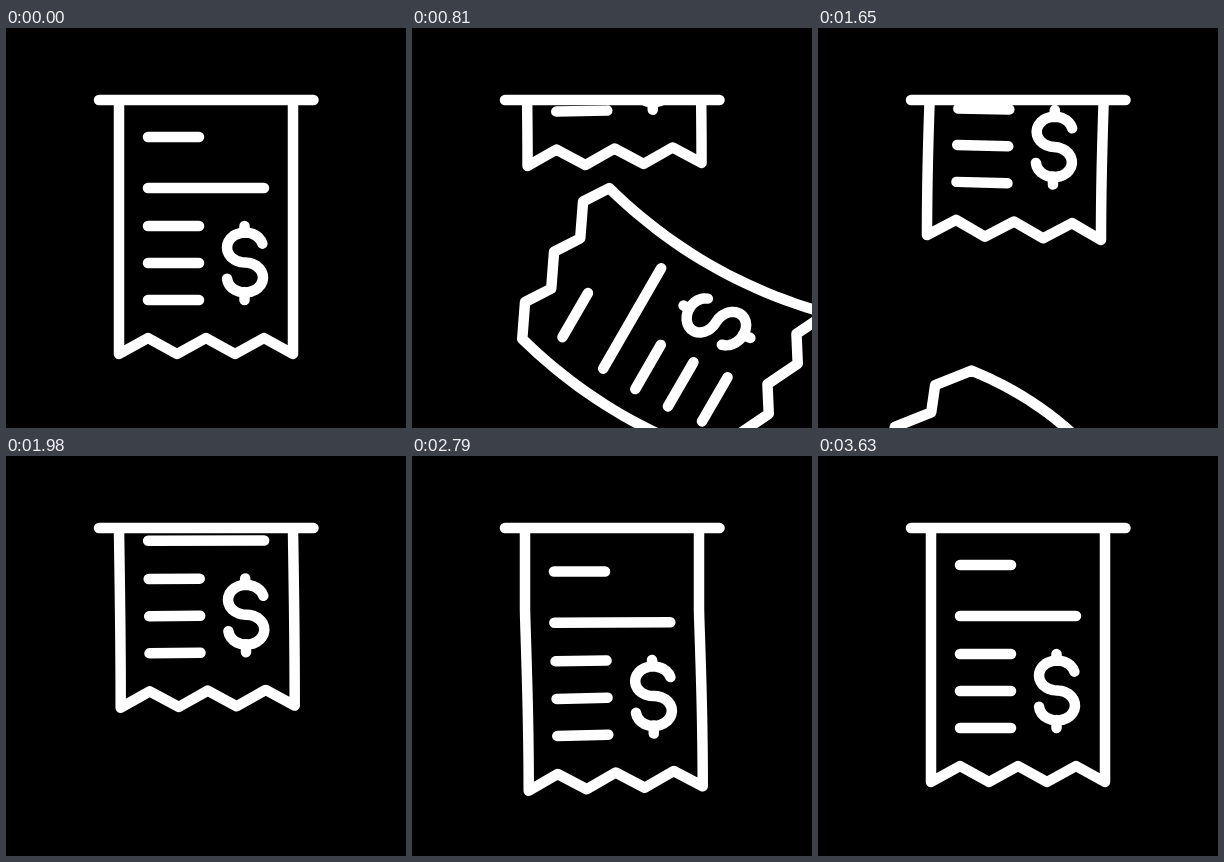
Write an HTML page with a canvas that moves like this. It is 400x400 px and loops after 4.14 s.

```html
<!DOCTYPE html>
<html lang="en">
<head>
<meta charset="utf-8">
<title>Receipt</title>
<style>
html, body { margin: 0; width: 100%; height: 100%; overflow: hidden; background: #000; }
canvas { display: block; }
</style>
</head>
<body>
<canvas id="stage" width="400" height="400"></canvas>
<script>
const ctx = document.getElementById('stage').getContext('2d');
const LOOP = 4140, STEP = 30, TEAR = 420, FEED = 560, SETTLE = 3270, REST = 3630;

// time, centre x, centre y, angle in degrees, bend
const FALL = [
  [0, 200, 200, 0, 0], [300, 184.5, 202, 7, 0], [540, 206, 229, -4, 4],
  [810, 262, 298, -60, 16], [1260, 191, 416, -67, 0], [1440, 142, 452, -58, -14],
  [1650, 183, 492, -46, -25], [2130, 235, 650, -30, 0]
];
// time, vertical offset of the new paper
const PRINT = [
  [560, -262], [810, -189.5], [1260, -133], [1650, -116.5], [2280, -37.5],
  [2700, -12], [2790, 6.5], [2850, 8], [3210, 0], [REST, 0]
];

// Smooth curve through keyframes, level at both ends
function sample(keys, t, c) {
  const last = keys.length - 1;
  if (t <= keys[0][0]) return keys[0][c];
  if (t >= keys[last][0]) return keys[last][c];
  const i = keys.findIndex(k => k[0] > t) - 1;
  const slope = j => j <= 0 || j >= last ? 0
    : (keys[j + 1][c] - keys[j - 1][c]) / (keys[j + 1][0] - keys[j - 1][0]);
  const a = keys[i], b = keys[i + 1], h = b[0] - a[0], u = (t - a[0]) / h, v = 1 - u;
  return v * v * (1 + 2 * u) * a[c] + u * u * (3 - 2 * u) * b[c]
    + h * u * v * (v * slope(i) - u * slope(i + 1));
}

const range = (n, f) => Array.from({ length: n + 1 }, (_, i) => f(i / n, i));
const zigzag = y => range(6, (u, i) => [113 + 29 * i, y - 16 * (i % 2)]);
const side = (x, from, to) => range(24, u => [x, from + (to - from) * u]);
const arc = (cy, from, to) => range(20, u => {
  const a = (from + (to - from) * u) * Math.PI / 180;
  return [239 + 18 * Math.cos(a), cy + 15 * Math.sin(a)];
});

const DETAILS = [
  ...[[109, 193], [160, 258], [198, 193], [235, 193], [272, 193]].map(([y, x]) => [[142, y], [x, y]]),
  [...arc(219.5, -15, -270), ...arc(249.5, -90, 175)],
  [[238.5, 198], [238.5, 204]],
  [[238.5, 264], [238.5, 272]]
];

function stroke(points) {
  ctx.beginPath();
  points.forEach(p => ctx.lineTo(...p));
  ctx.stroke();
}

function drawPaper(warp, torn) {
  const top = torn ? 75 : 40;
  const outline = [...side(113, top, 326), ...zigzag(326), ...side(287, 326, top)];
  if (torn) outline.push(...zigzag(75).reverse());
  [outline, ...DETAILS].forEach(line => stroke(line.map(p => warp(...p))));
}

function drawFalling(t) {
  const [cx, cy, angle, bend] = [1, 2, 3, 4].map(c => sample(FALL, t, c));
  ctx.save();
  ctx.translate(cx, cy);
  ctx.rotate(angle * Math.PI / 180);
  ctx.translate(-200, -200);
  drawPaper((x, y) => [x - bend * (1 - ((y - 200) / 125) ** 2), y], t >= TEAR);
  ctx.restore();
}

function drawPrinting(t) {
  const offset = sample(PRINT, t, 1);
  const sway = t < SETTLE ? Math.cos(2 * Math.PI * (t - 1275) / 250)
    : Math.max(0, 1 - (t - SETTLE) / (REST - SETTLE)) ** 2;
  drawPaper((x, y) => {
    const e = Math.min(1, Math.max(0, (y - 150) / 176));
    return [
      x + 4 * sway * Math.sin(e * Math.PI / 2),
      y + offset - sway * (x - 200) * 0.028 * Math.min(1, 2 * e)
    ];
  }, false);
}

function frame(now) {
  const t = Math.floor(now % LOOP / STEP) * STEP;
  ctx.fillStyle = '#000';
  ctx.fillRect(0, 0, 400, 400);
  ctx.strokeStyle = '#fff';
  ctx.lineWidth = 10.5;
  ctx.lineCap = ctx.lineJoin = 'round';
  ctx.save();
  ctx.beginPath();
  ctx.rect(0, 72, 400, 328);
  ctx.clip();
  if (t < 2130) drawFalling(t);
  if (t >= FEED) drawPrinting(t);
  ctx.restore();
  stroke([[93, 72], [307.5, 72]]);
  requestAnimationFrame(() => frame(performance.now() - start));
}

const start = performance.now();
frame(0);
</script>
</body>
</html>
```
